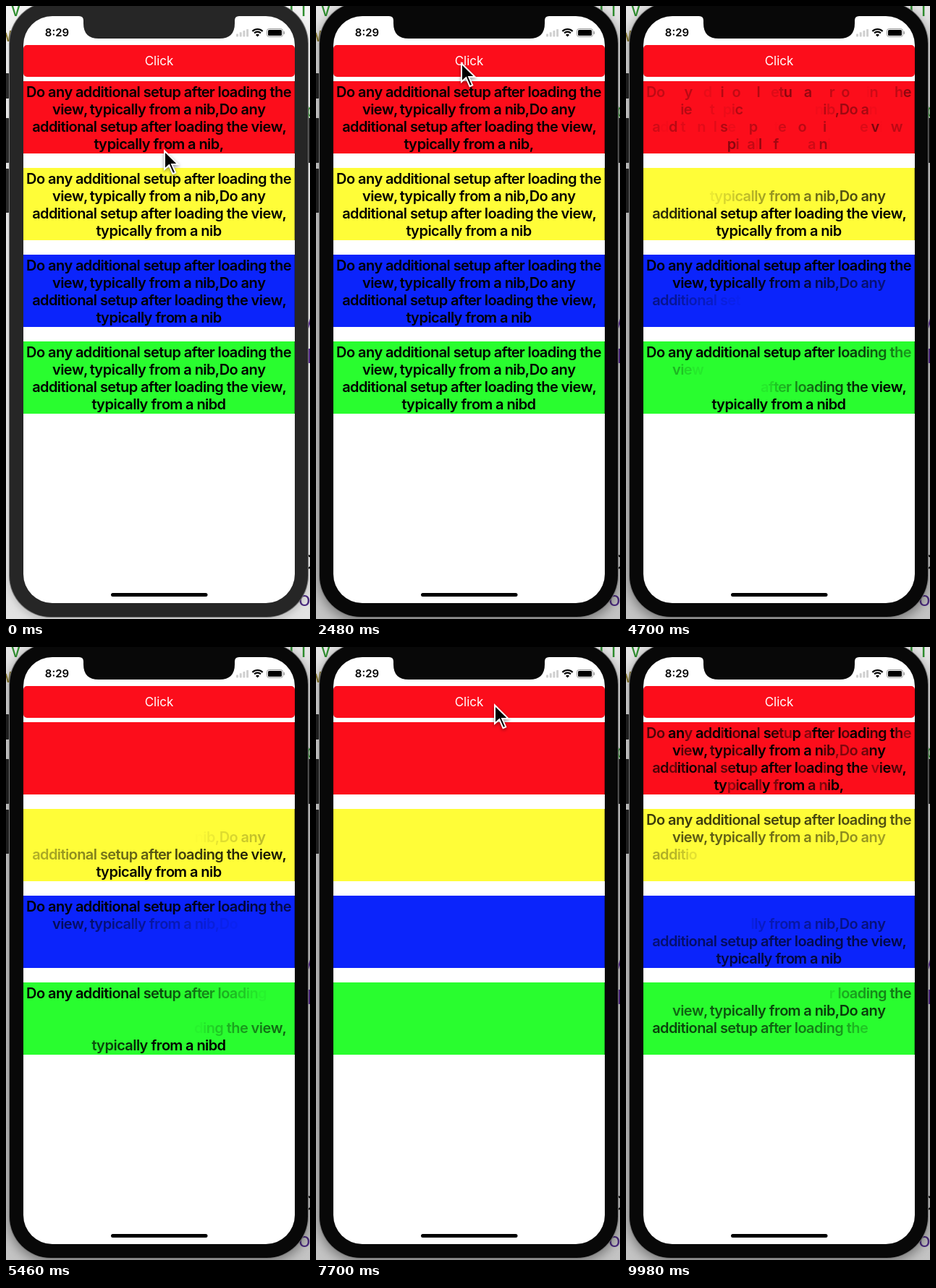
An HTML page with a canvas that plays this animation: 420 by 848 pixels, repeating every 10 s.

```html
<!DOCTYPE html>
<html>
<head>
<meta charset="utf-8">
<style>
  html, body { margin: 0; width: 100%; height: 100%; overflow: hidden; background: #fff; }
  canvas { display: block; }
</style>
</head>
<body>
<canvas id="stage" width="420" height="848"></canvas>
<script>
const ctx = document.getElementById('stage').getContext('2d');
const LOOP = 10000, ACTIVE_AT = 2400, OUT_AT = 2660, IN_AT = 8080;
const SPAN = 3150, STEP = 23;
const LABEL_FONT = '600 20px Inter, sans-serif', LABEL_SPACING = '-0.58px';

const clamp = v => Math.max(0, Math.min(1, v));

function box(x, y, w, h, r, color) {
  ctx.fillStyle = color;
  ctx.beginPath();
  ctx.roundRect(x, y, w, h, r);
  ctx.fill();
}

function text(str, x, y, font, color, align = 'left', spacing = '0px') {
  ctx.font = font;
  ctx.letterSpacing = spacing;
  ctx.textAlign = align;
  ctx.fillStyle = color;
  ctx.fillText(str, x, y);
}

function seeded(seed) {
  return () => {
    seed = (seed * 1664525 + 1013904223) % 4294967296;
    return seed / 4294967296;
  };
}

// Rank tells when a letter takes its turn; null means random order.
const labels = [
  { y: 104, color: '#fc0d1b', tail: ',', rank: null },
  { y: 224, color: '#fffd38', tail: '', rank: i => i },
  { y: 344, color: '#0b24fb', tail: '', rank: (i, n) => n - 1 - i },
  { y: 464, color: '#29fd2f', tail: 'd', rank: (i, n) => Math.abs(i - n / 2) * 2 }
];

function layout(label) {
  const random = seeded(29);
  const lines = [
    'Do any additional setup after loading the',
    'view, typically from a nib,Do any',
    'additional setup after loading the view,',
    'typically from a nib' + label.tail
  ];
  const count = lines.join(' ').length;
  let index = 0;
  ctx.font = LABEL_FONT;
  ctx.letterSpacing = LABEL_SPACING;
  ctx.textAlign = 'left';
  label.letters = [];
  lines.forEach((line, row) => {
    const left = 211 - ctx.measureText(line).width / 2;
    [...line].forEach((char, col) => {
      const letter = { char, x: left + ctx.measureText(line.slice(0, col)).width, y: label.y + 22 + row * 24 };
      if (label.rank) {
        const rank = label.rank(index, count);
        letter.delay = rank * STEP;
        letter.outTime = 150 + rank * 18;
        letter.inTime = Math.max(60, SPAN - letter.delay);
        letter.power = 0.5;
      } else {
        letter.delay = random() * 1450;
        letter.outTime = letter.inTime = 100 + random() * (2700 - letter.delay);
        letter.power = 1;
      }
      label.letters.push(letter);
      index++;
    });
    index++;
  });
}

function opacity(letter, t) {
  if (t < OUT_AT) return 1;
  if (t < IN_AT) {
    const elapsed = t - OUT_AT;
    return elapsed > 3260 ? 0 : 1 - clamp((elapsed - letter.delay) / letter.outTime);
  }
  return clamp((t - IN_AT - letter.delay) / letter.inTime) ** letter.power;
}

function drawLabel(label, t) {
  ctx.fillStyle = label.color;
  ctx.fillRect(24, label.y, 375, 100);
  ctx.fillStyle = 'rgba(0,0,0,.25)';
  ctx.fillRect(398, label.y, 1, 100);
  for (const l of label.letters) {
    ctx.globalAlpha = opacity(l, t);
    if (ctx.globalAlpha > 0) text(l.char, l.x, l.y, LABEL_FONT, '#000', 'left', LABEL_SPACING);
  }
  ctx.globalAlpha = 1;
}

function drawDesktop(active) {
  const shade = ctx.createLinearGradient(0, 0, 0, 848);
  shade.addColorStop(0, active ? '#e6e6e6' : '#f4f4f4');
  shade.addColorStop(0.36, active ? '#d2d2d2' : '#ececec');
  shade.addColorStop(1, active ? '#c4c4c4' : '#e2e2e2');
  ctx.fillStyle = shade;
  ctx.fillRect(0, 0, 420, 848);
  const code = '28px "Noto Sans Mono", monospace';
  text('V', 5, 14, code, '#2f8f2f');
  text('w', -9, 49, code, '#8a7a2a');
  text('IT', 386, 14, code, '#2f8f2f');
  text('p', 414, 154, code, '#2f8f2f');
  text('A', 415, 446, code, '#5b2f91');
  text('E', 415, 494, code, '#5b2f91');
  text('D', 409, 779, code, '#000');
  text('o', 404, 830, code, '#4b2a80');
}

function drawPhone(active) {
  const body = active ? '#080808' : '#262626';
  const keys = active ? '#242424' : '#2c2c2c';
  for (const [y, h] of [[93, 35], [155, 62], [225, 61]]) box(-4, y, 9, h, 2, keys);
  box(416, 155, 8, 62, 2, keys);
  ctx.save();
  ctx.shadowColor = active ? 'rgba(0,0,0,.4)' : 'rgba(0,0,0,.15)';
  ctx.shadowBlur = active ? 16 : 10;
  ctx.shadowOffsetY = 5;
  box(4, -6, 414, 852, 58, '#777');
  ctx.restore();
  box(5, -5, 412, 850, 57, body);
  box(24, 14, 375, 812, 40, '#fff');
  ctx.fillStyle = body;
  ctx.beginPath();
  ctx.moveTo(101, 13);
  ctx.lineTo(101, 14);
  ctx.quadraticCurveTo(107, 14, 107, 20);
  ctx.lineTo(107, 24);
  ctx.quadraticCurveTo(107, 45, 128, 45);
  ctx.lineTo(295, 45);
  ctx.quadraticCurveTo(316, 45, 316, 24);
  ctx.lineTo(316, 20);
  ctx.quadraticCurveTo(316, 14, 322, 14);
  ctx.lineTo(322, 13);
  ctx.fill();
}

function drawStatus() {
  text('8:29', 70.5, 42, '600 15px Inter, sans-serif', '#000', 'center');
  for (let i = 0; i < 4; i++) {
    const h = 4 + i * 2.2;
    box(318 + i * 4.7, 42.5 - h, 3, h, 0.8, '#cfcfcf');
  }
  ctx.strokeStyle = ctx.fillStyle = '#000';
  ctx.lineWidth = 2.2;
  for (const r of [10, 6.3]) {
    ctx.beginPath();
    ctx.arc(347.5, 42, r, -Math.PI * 0.75, -Math.PI * 0.25);
    ctx.stroke();
  }
  ctx.beginPath();
  ctx.moveTo(347.5, 42.5);
  ctx.arc(347.5, 42.5, 3.6, -Math.PI * 0.75, -Math.PI * 0.25);
  ctx.fill();
  ctx.strokeStyle = '#999';
  ctx.lineWidth = 1;
  ctx.beginPath();
  ctx.roundRect(360.5, 31.5, 22, 11, 3);
  ctx.stroke();
  box(362, 33, 19, 8, 1.6, '#000');
  box(383.7, 35, 1.3, 4, 0.6, '#999');
}

// Time, x, y of the pointer tip.
const pointerPath = [
  [0, 218, 198], [300, 218, 198], [1000, 200, 88], [1180, 200, 86], [1800, 200, 77],
  [3700, 200, 77], [4050, 440, 150], [7250, 440, 150], [7700, 246, 78], [7950, 208, 77],
  [8500, 208, 77], [8850, 440, 150], [LOOP, 440, 150]
];

function drawPointer(t) {
  const k = pointerPath.findIndex(p => p[0] > t);
  const [t0, x0, y0] = pointerPath[k - 1], [t1, x1, y1] = pointerPath[k];
  const f = (t - t0) / (t1 - t0), ease = f * f * (3 - 2 * f);
  ctx.save();
  ctx.translate(x0 + (x1 - x0) * ease, y0 + (y1 - y0) * ease);
  const arrow = new Path2D('M0 0V30L7 24L12 35.5L17.5 33L12.5 22H22Z');
  ctx.shadowColor = 'rgba(0,0,0,.4)';
  ctx.shadowBlur = 4;
  ctx.shadowOffsetY = 2;
  ctx.fillStyle = '#fff';
  ctx.fill(arrow);
  ctx.shadowColor = 'transparent';
  ctx.fillStyle = '#000';
  ctx.fill(new Path2D('M2 5V25.5L7.7 20.6L13 32.8L15 31.9L9.6 20H17.2Z'));
  ctx.restore();
}

function frame(now) {
  const t = now % LOOP;
  const active = t >= ACTIVE_AT;
  drawDesktop(active);
  drawPhone(active);
  drawStatus();
  box(24, 54, 375, 44, 5, '#fc0d1b');
  text('Click', 211.5, 82, '17px Inter, sans-serif', '#fff', 'center');
  labels.forEach(label => drawLabel(label, t));
  box(145, 812, 133.5, 5, 2.5, '#000');
  drawPointer(t);
  requestAnimationFrame(frame);
}

labels.forEach(layout);
requestAnimationFrame(frame);
</script>
</body>
</html>
```
